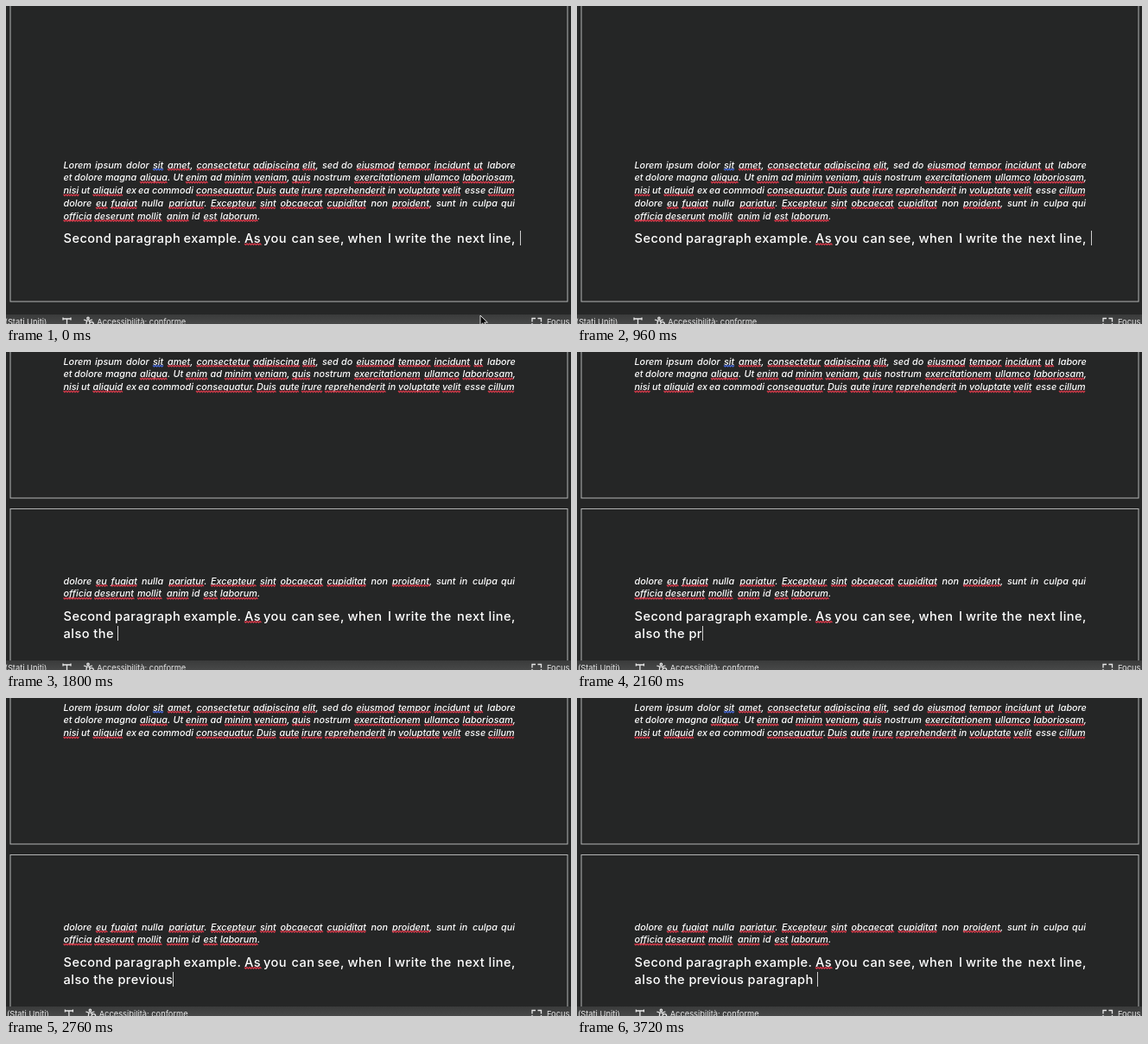
An HTML page for the animation above (3840 ms loop, 654 by 368 pixels).

```html
<!DOCTYPE html>
<html lang="en">
<head>
<meta charset="utf-8">
<title>Typing across a page break</title>
<style>
  html, body { margin: 0; width: 100%; height: 100%; overflow: hidden; background: #252626; }
  svg { display: block; width: 654px; height: 368px; }
  text { fill: #fff; font-family: Inter, Roboto, sans-serif; white-space: pre; }
  .small { font-size: 10.8px; font-style: italic; font-weight: 500; font-feature-settings: "cv11"; }
  .large { font-size: 14.6px; font-weight: 450; letter-spacing: .46px; }
  .bar text { font-size: 9.3px; fill: #e8e8e8; }
  .wave { fill: none; stroke: #d33a4a; stroke-width: 1.4; }
  .blue { stroke: #4668d8; }
  .page { fill: none; stroke: #b4b5b5; stroke-width: 1; }
  .icon { fill: none; stroke: #e8e8e8; stroke-width: 1.3; }
</style>
</head>
<body>
<svg viewBox="0 0 654 368">
  <defs>
    <linearGradient id="shade" x2="0" y2="1">
      <stop offset="0" stop-color="#3a3b3b"/>
      <stop offset="1" stop-color="#474848"/>
    </linearGradient>
  </defs>
  <rect width="654" height="368" fill="#252626"/>
  <rect id="page1" class="page" x="5" y="-500" width="645" height="842"/>
  <rect id="page2" class="page" x="5" y="181.5" width="645" height="842"/>
  <g id="upper"></g>
  <g id="lower"></g>
  <text id="typed" class="large" x="66.5" y="331"></text>
  <rect id="caret" width="1" height="17" fill="#cfcfcf"/>
  <g class="bar">
    <rect y="357" width="654" height="11" fill="url(#shade)"/>
    <g id="status">
      <text x="-1.5" y="369.3">(Stati Uniti)</text>
      <path class="icon" d="M65.5 362H75.5M70.5 362V368M66 360.5v3M75 360.5v3"/>
      <circle class="icon" cx="95" cy="361.3" r="1.2"/>
      <path class="icon" d="M90 363l3.5 1.2h3l3.5-1.2M93.5 364l-.5 4M96.5 364l.4 2"/>
      <circle class="icon" cx="99" cy="368" r="2.3"/>
      <text x="105.3" y="369.3">Accessibilità: conforme</text>
    </g>
    <path class="icon" d="M609 365.5v-4h4M615.5 361.5h4v4M609 367v3M619.5 367v3"/>
    <text x="626" y="369.3">Focus</text>
  </g>
  <path id="mouse" d="M549 358v11.5l2.8-2.6 2 4.5 2-1-2-4.2h3.6z" fill="#0b0b0b" stroke="#eee" stroke-width=".9"/>
</svg>
<script>
const LOOP = 3840, STEP = 120, BREAK = 1080;
const $ = id => document.getElementById(id);

function add(parent, tag, attrs) {
  const el = document.createElementNS("http://www.w3.org/2000/svg", tag);
  for (const key in attrs) el.setAttribute(key, attrs[key]);
  return parent.appendChild(el);
}

function wave(parent, x, y, width, cls) {
  let d = `M${x} ${y}`;
  for (let i = 0; i < Math.round(width / 1.5); i++) d += `l1.5 ${i % 2 ? -1.4 : 1.4}`;
  add(parent, "path", { d, class: cls });
}

// Each item is word@x; * marks a spelling wave, ^ a grammar wave.
function line(parent, y, cls, items) {
  for (const item of items.split(" ")) {
    const [, mark, word, x] = item.match(/^([*^]?)(.+)@(.+)$/);
    const el = add(parent, "text", { x, y, class: cls });
    el.textContent = word;
    if (!mark) continue;
    const width = el.getSubStringLength(0, word.replace(/[.,]$/, "").length);
    wave(parent, +x, y + 1, width, mark === "^" ? "wave blue" : "wave");
  }
}

const lines = [
  "Lorem@66.5 ipsum@103 dolor@139 ^sit@170 *amet,@187 *consectetur@220.5 *adipiscing@286 *elit,@343 sed@366 do@388 *eiusmod@405.5 *tempor@454 *incidunt@495.5 *ut@541.5 labore@557",
  "et@66.5 dolore@79 magna@115 *aliqua.@155 Ut@193.5 *enim@208 ad@236.5 *minim@253 *veniam,@287.5 *quis@331 nostrum@356 *exercitationem@403 *ullamco@484 *laboriosam,@528.5",
  "*nisi@66.5 ut@87 *aliquid@100.5 ex@139 ea@153 commodi@169 *consequatur.@220 *Duis@290 *aute@316.5 *irure@342 *reprehenderit@369 in@442 *voluptate@454 *velit@505 esse@531 *cillum@558",
  "dolore@66.5 *eu@104 *fugiat@121.5 nulla@157 *pariatur.@188.5 *Excepteur@237 *sint@294 *obcaecat@317.5 *cupiditat@371.5 non@422.5 *proident,@447 sunt@498 in@525 culpa@540 qui@573",
  "*officia@66.5 *deserunt@102 *mollit@152 *anim@186 id@215 *est@228.5 *laborum.@248"
];
lines.forEach((items, i) =>
  line($(i < 3 ? "upper" : "lower"), 187.5 + 14.8 * i, "small", items));
line($("lower"), 274, "large",
  "Second@66.5 paragraph@126 example.@205.5 *As@276 you@298 can@330.5 see,@360.5 when@395.5 I@442 write@450 the@492 next@522 line,@558.5");

const phrase = "also the previous paragraph ";
const keys = [[1080, 1], [1800, 9], [2400, 13], [2760, 17], [3720, 28]];

function typedCount(t) {
  if (t < BREAK) return 0;
  const i = Math.max(1, keys.findIndex(k => k[0] >= t));
  const [t0, n0] = keys[i - 1], [t1, n1] = keys[i];
  return Math.floor(n0 + (n1 - n0) * (t - t0) / (t1 - t0) + 1e-6);
}

function caretAlpha(t) {
  if (t === BREAK || (t >= 240 && t < 720)) return 0;
  return t === 120 ? .5 : 1;
}

function draw(time) {
  const t = Math.floor(time % LOOP / STEP) * STEP;
  const split = t >= BREAK;
  const scroll = `translate(0 ${split ? -173 : 0})`;
  $("page1").setAttribute("transform", scroll);
  $("upper").setAttribute("transform", scroll);
  $("lower").setAttribute("transform", `translate(0 ${split ? 36.7 : 0})`);
  $("page2").style.display = split ? "" : "none";

  const typed = $("typed");
  typed.textContent = phrase.slice(0, typedCount(t));
  const caret = $("caret");
  caret.setAttribute("x", split ? Math.round(66.5 + typed.getComputedTextLength()) : 595);
  caret.setAttribute("y", split ? 317 : 260);
  caret.setAttribute("opacity", caretAlpha(t));

  $("mouse").style.display = t < 840 ? "" : "none";
  $("status").setAttribute("transform", `translate(${t >= 2160 ? 2.4 : 0} 0)`);
}

const start = performance.now();
function tick() {
  draw(performance.now() - start);
  requestAnimationFrame(tick);
}
tick();
</script>
</body>
</html>
```
